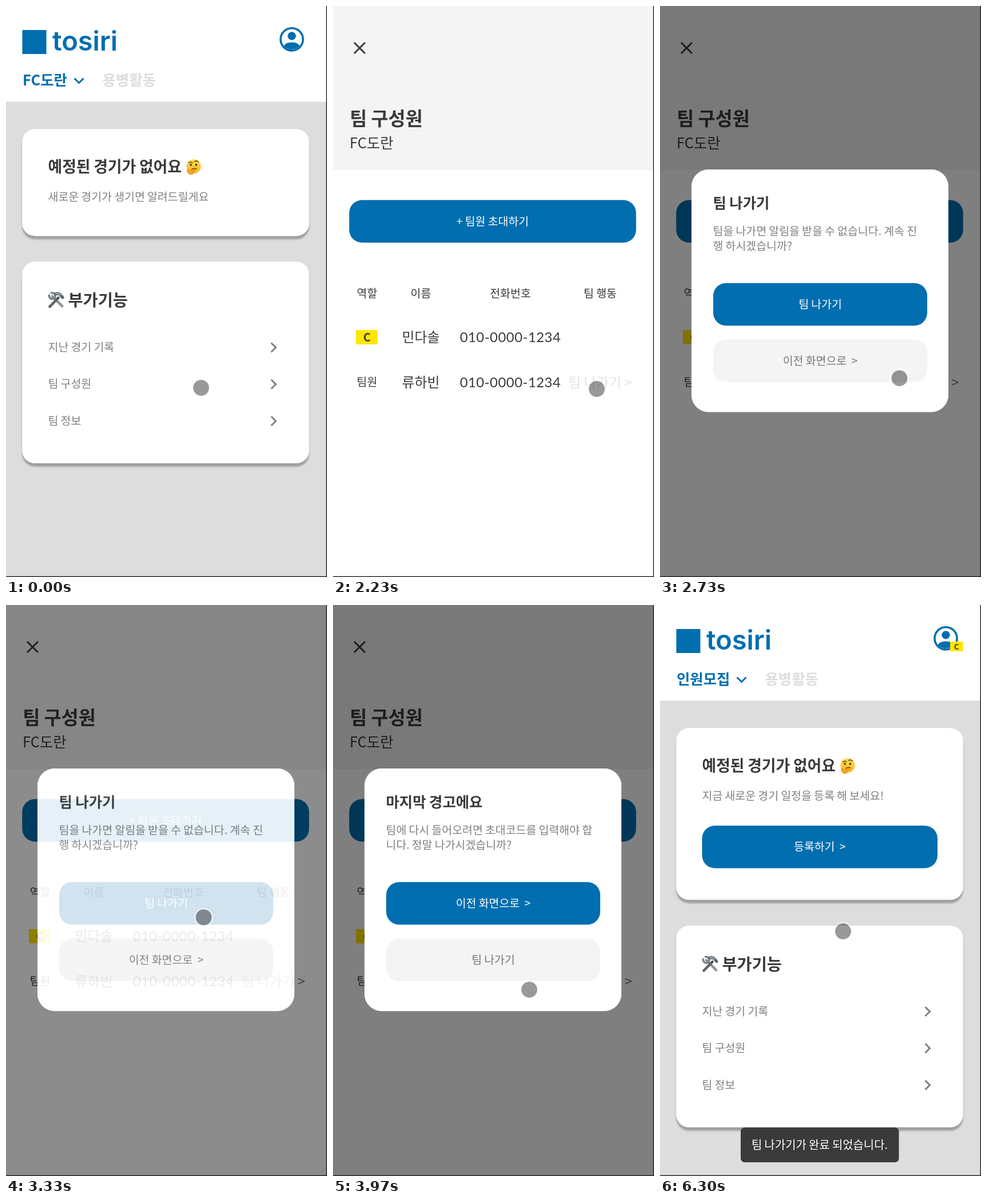
An HTML page that plays this animation: 561 by 999 pixels, repeating every 7000 ms.

```html
<!DOCTYPE html>
<html lang="ko">
<head>
<meta charset="utf-8">
<title>팀 나가기</title>
<style>
  html, body { margin: 0; width: 100%; height: 100%; overflow: hidden; background: #fff; }
  svg { display: block; width: 100%; height: 100%; }
  text { font-family: "Noto Sans CJK KR", "Noto Sans CJK", "Noto Sans", sans-serif; white-space: pre; word-spacing: -.065em; }
</style>
</head>
<body>
<svg id="stage" viewBox="0 0 561 999" xmlns="http://www.w3.org/2000/svg"></svg>
<script>
const LOOP = 7000;
const BLUE = '#006eaf', INK = '#3a3a3a', GREY = '#808080', YELLOW = '#ffe600';
const SMALL = 19.45, MID = 23.9, TAB = 25.4, HEAD = 26.8;
const TEAM = 'FC도란';
const stage = document.getElementById('stage');

// Text placed by the vertical centre of its glyphs.
const text = (x, cy, size, fill, str, extra = '') =>
  `<text x="${x}" y="${cy + size * 0.37}" font-size="${size}" fill="${fill}" ${extra}>${str}</text>`;
const bold = (x, cy, size, fill, str, extra = '') =>
  text(x, cy, size, fill, str, 'font-weight="700" ' + extra);
const mid = (x, cy, size, fill, str, extra = '') =>
  text(x, cy, size, fill, str, 'text-anchor="middle" ' + extra);
const box = (x, y, w, h, r, fill, extra = '') =>
  `<rect x="${x}" y="${y}" width="${w}" height="${h}" rx="${r}" fill="${fill}" ${extra}/>`;
const line = (d, stroke, width) =>
  `<path d="${d}" fill="none" stroke="${stroke}" stroke-width="${width}"/>`;
const group = (id, body, extra = '') => `<g id="${id}" ${extra}>${body}</g>`;
const button = (x, y, w, fill, color, str, id = '') =>
  group(id, box(x, y, w, 74.5, 22.4, fill) + mid(x + w / 2, y + 37.3, SMALL, color, str));
const card = (y, h) => box(28.3, y, 501.4, h, 22.4, '#fff', 'filter="url(#drop)"');

const thinking = `<g transform="translate(328 281.5)">
  <circle cy="-1" r="12.6" fill="url(#face)"/>
  <ellipse cx="-5" cy="-3.6" rx="1.7" ry="2.2" fill="#5b3508"/>
  <ellipse cx="4.4" cy="-3.6" rx="1.7" ry="2.2" fill="#5b3508"/>
  <path d="M-8.6 -7.2Q-5 -9 -2 -7.4M1.6 -9.4Q5 -11.6 8.4 -8.8M-3.4 4.2Q1 2 5 3.4"
    fill="none" stroke="#6b400c" stroke-width="1.5" stroke-linecap="round"/>
  <path d="M-11.5 6Q-11 2.6 -8.6 4.2L-7.4 7.4L1.4 4.6Q3.6 4.6 2.8 6.6L-2 8.6Q1.6 12.6 -4 13Q-10.6 13.4 -11.5 6Z"
    fill="#f5a524" stroke="#d57f14" stroke-width=".8"/></g>`;

const tools = `<g transform="translate(87.5 514.5)" fill="none" stroke-linecap="round">
  <path d="M-6.5 -6.5L10.5 10.5" stroke="#8d969c" stroke-width="4.6"/>
  <path d="M-12 -8.5A5.4 5.4 0 1 0 -8 -12.6" stroke="#7b858b" stroke-width="3.6"/>
  <path d="M4 -4L-11 11.5" stroke="#4a4f54" stroke-width="4.4"/>
  <path d="M2 -1.5L-10.5 11" stroke="#7a8086" stroke-width="1.4"/>
  <path d="M-1 -10.5Q4 -13 8.5 -8L11.5 -4.5" stroke="#5d666c" stroke-width="5"/>
  <path d="M0 -11Q4 -12.6 8 -8.6" stroke="#b9c1c6" stroke-width="1.5"/></g>`;

const person = `<circle cx="499.5" cy="58.3" r="19.6" fill="none" stroke="${BLUE}" stroke-width="3.6"/>
  <circle cx="499.5" cy="52.5" r="7.2" fill="${BLUE}"/>
  <path d="M485.5 70Q489 63.6 499.5 63.6T513.5 70Q508 76 499.5 76T485.5 70Z" fill="${BLUE}"/>`;

function row(cy, label, id) {
  return group(id, text(73.5, cy, SMALL, GREY, label) +
    line(`M463.5 ${cy - 7.5}l8 8l-8 8`, GREY, 3));
}

function home(id, team, shift, tabX, cardHeight, first) {
  return group(id,
    box(0, 0, 561, 999, 0, '#ddd') + box(0, 0, 561, 167.5, 0, '#fff') +
    box(28.5, 42, 42, 42, 0, BLUE) +
    `<text x="81" y="77.5" font-size="47" font-weight="600" fill="${BLUE}"
      style="font-family:Inter,sans-serif">tosiri</text>` +
    person +
    bold(29, 129.5, TAB, BLUE, team) +
    line(`M${tabX - 49} 126.5l8 8l8 -8`, BLUE, 3) +
    bold(tabX, 129.5, TAB, '#ddd', '용병활동') +
    card(215.3, cardHeight) +
    bold(73.5, 281.5, HEAD, INK, '예정된 경기가 없어요') + thinking + first +
    `<g transform="translate(0 ${shift})">` +
    card(447.3, 352.7) + tools +
    bold(108.5, 514.5, 28.4, INK, '부가기능') +
    row(597, '지난 경기 기록', id + 'Log') +
    row(661.3, '팀 구성원', id + 'Team') +
    row(725.7, '팀 정보', id + 'Info') + '</g>');
}

function member(cy, name, phone) {
  return mid(153.5, cy, MID, INK, name) +
    mid(310, cy + 0.5, MID, INK, phone, 'letter-spacing=".5" style="font-family:Lato,sans-serif"');
}

const members = group('members',
  box(0, 0, 561, 999, 0, '#fff') + box(0, 0, 561, 287, 0, '#f4f4f4') +
  line('M37 64l19 19M56 64l-19 19', INK, 3) +
  bold(29.2, 196.8, 32.8, INK, '팀 구성원') +
  text(29, 240, TAB, INK, TEAM) +
  button(28.3, 339.5, 501.4, BLUE, '#fff', '+ 팀원 초대하기', 'invite') +
  [[59.5, '역할'], [153.5, '이름'], [310, '전화번호'], [467, '팀 행동']]
    .map(([x, s]) => mid(x, 502.5, SMALL, INK, s)).join('') +
  box(40, 567, 38, 25, 0, YELLOW) +
  mid(59.5, 579.5, SMALL, INK, 'C', 'font-weight="700"') +
  member(579, '민다솔', '010-0000-1234') +
  mid(59.5, 658, SMALL, INK, '팀원') +
  member(658, '류하빈', '010-0000-1234') +
  group('leave', mid(467, 658, MID, '#777', '팀 나가기 &gt;')));

// The shade lies only outside the dialog box.
function dialog(id, title, lines, yes, no) {
  return group(id,
    `<path d="M0 0H561V999H0ZM85 286H474A30 30 0 0 1 504 316V680A30 30 0 0 1 474 710H85
      A30 30 0 0 1 55 680V316A30 30 0 0 1 85 286Z" fill-rule="evenodd" fill="#000" fill-opacity=".5"/>` +
    box(55, 286, 449, 424.5, 30, '#fff') +
    bold(92.5, 345, TAB, INK, title) +
    lines.map((s, i) => text(92.5, 394 + 25.5 * i, SMALL, GREY, s)).join('') +
    button(93, 484.7, 374, BLUE, '#fff', yes, id + 'Yes') +
    button(93, 583.5, 374, '#f4f4f4', '#777', no, id + 'No'));
}

const BACK = '이전 화면으로\u00a0\u00a0&gt;';

stage.innerHTML = `<defs>
  <filter id="drop" x="-5%" y="-5%" width="110%" height="115%">
    <feDropShadow dx="0" dy="6" stdDeviation="1.7" flood-color="#000" flood-opacity=".28"/></filter>
  <linearGradient id="face" x2="0" y2="1"><stop stop-color="#ffe14a"/><stop offset="1" stop-color="#f9b423"/></linearGradient>
  </defs>` +
  home('home', TEAM, 0, 168.5, 187, text(73.5, 333.5, SMALL, GREY, '새로운 경기가 생기면 알려드릴게요')) +
  members +
  home('next', '인원모집', 113.7, 183.5, 300.5,
    text(73.5, 333.5, SMALL, GREY, '지금 새로운 경기 일정을 등록 해 보세요!') +
    button(73.5, 386, 411.5, BLUE, '#fff', '등록하기\u00a0\u00a0&gt;', 'add') +
    box(507, 64, 22.5, 17, 0, YELLOW) +
    mid(518.3, 72.7, 13.5, INK, 'C', 'font-weight="700"')) +
  group('toast', box(141, 914, 276.5, 61, 7, INK) +
    mid(279, 945, 19.9, '#fff', '팀 나가기가 완료 되었습니다.')) +
  dialog('ask', '팀 나가기',
    ['팀을 나가면 알림을 받을 수 없습니다. 계속 진', '행 하시겠습니까?'], '팀 나가기', BACK) +
  dialog('warn', '마지막 경고에요',
    ['팀에 다시 들어오려면 초대코드를 입력해야 합', '니다. 정말 나가시겠습니까?'], BACK, '팀 나가기') +
  group('cursor', `<circle r="14" fill="#000" fill-opacity=".4"/>
    <circle r="15.3" fill="none" stroke="#fff" stroke-opacity=".5" stroke-width="2.6"/>`) +
  box(559.6, 0, 1.4, 999, 0, '#222') + box(0, 997.6, 561, 1.4, 0, '#222');

const $ = id => document.getElementById(id);
const show = (id, on) => $(id).setAttribute('display', on ? 'inline' : 'none');
const ramp = (t, a, b) => Math.min(1, Math.max(0, (t - a) / (b - a)));
const smooth = k => k * k * (3 - 2 * k);

function fade(id, value) {
  show(id, value > 0);
  $(id).setAttribute('opacity', value.toFixed(3));
}

// A touched control dims to 0.2 and recovers after release.
const press = (id, t, down, up) =>
  fade(id, 1 - 0.8 * (smooth(ramp(t, down, down + 150)) - smooth(ramp(t, up, up + 250))));

const path = [
  [30, 341, 668], [130, 340, 671], [1170, 340, 671], [1430, 338, 752], [1600, 338, 749],
  [1770, 338, 749], [2130, 461, 670], [2370, 461, 670], [2570, 442, 685], [3070, 345.5, 546.5],
  [3650, 345.5, 546.5], [3970, 343, 673], [4080, 343, 680], [4430, 340, 631],
  [5800, 340, 631], [6300, 320, 571]
];

function cursorAt(t) {
  const i = path.findIndex(p => p[0] > t);
  if (i === 0) return path[0].slice(1);
  if (i < 0) return path[path.length - 1].slice(1);
  const [a, b] = [path[i - 1], path[i]];
  const k = smooth(ramp(t, a[0], b[0]));
  return [a[1] + (b[1] - a[1]) * k, a[2] + (b[2] - a[2]) * k];
}

function draw(t) {
  show('home', t < 930);
  show('members', t >= 930 && t < 4950);
  show('next', t >= 4950);
  fade('toast', ramp(t, 4950, 5150));
  press('homeTeam', t, 430, 930);
  press('leave', t, 2075, 2370);
  press('askYes', t, 3100, 3400);
  press('warnNo', t, 4630, 4900);
  fade('ask', ramp(t, 2370, 2670) - ramp(t, 3305, 3570));
  fade('warn', ramp(t, 3540, 3800) - ramp(t, 5255, 5330));
  $('cursor').setAttribute('transform', `translate(${cursorAt(t).map(v => v.toFixed(2)).join(' ')})`);
}

const start = performance.now();
function tick() {
  draw((performance.now() - start) % LOOP);
  requestAnimationFrame(tick);
}
tick();
</script>
</body>
</html>
```
